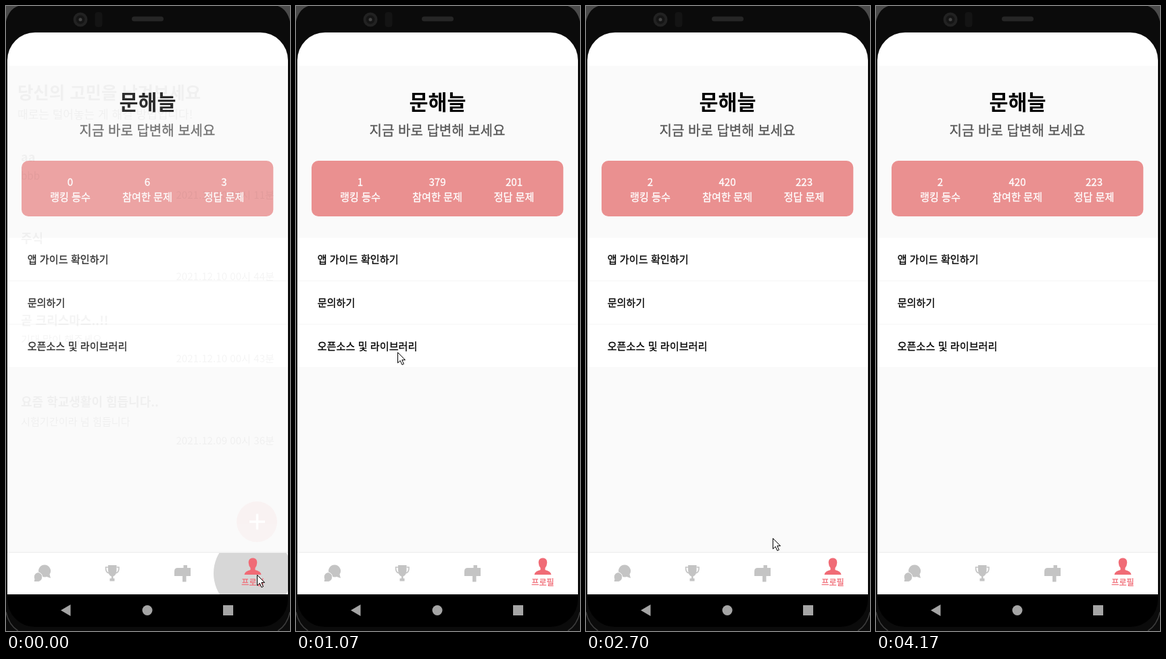
An HTML page that plays this animation: 420 px wide and 921 px high, repeating every 4.44 s.

```html
<!DOCTYPE html>
<html lang="ko">
<head>
<meta charset="utf-8">
<title>프로필</title>
<style>
  html, body { margin: 0; width: 100%; height: 100%; overflow: hidden; background: #0b0b0b; }
  svg { display: block; width: 420px; height: 921px; }
  text { font: 500 15.15px "Noto Sans CJK KR", "Noto Sans CJK JP", "Noto Sans", sans-serif; }
  .mid { text-anchor: middle; }
  .end { text-anchor: end; }
  .name { font-size: 30.4px; font-weight: 700; }
  .lead { font-size: 20px; fill: #555; stroke: #555; }
  .tab { font-size: 12.1px; fill: #f06b76; stroke: #f06b76; }
  .medium, .lead, .tab { stroke-width: .3px; }
  #old text { font-weight: 400; }
  #old .title { font-size: 25.4px; font-weight: 700; }
  #old .head { font-size: 18px; font-weight: 700; }
</style>
</head>
<body>
<svg viewBox="0 0 420 921">
  <defs>
    <clipPath id="screen"><path d="M2 867V80A41 41 0 0 1 43 39H376A41 41 0 0 1 417 80V867Z"/></clipPath>
    <clipPath id="bar"><path d="M2 806H417V867H2Z"/></clipPath>
  </defs>

  <!-- device -->
  <rect width="420" height="921" fill="#0b0b0b"/>
  <path d="M0 0H18Q4 5 0 23ZM420 0H402Q416 5 420 23Z" fill="#4a4a4a"/>
  <path d="M0 893Q4 912 18 921M402 921Q416 912 420 893" fill="none" stroke="#3c3c3c" stroke-width="1.5"/>
  <rect x="2" y="39" width="415" height="876" rx="41"/>
  <circle cx="110" cy="20" r="10.5" fill="#222"/>
  <circle cx="110" cy="20" r="6.500" fill="#151515"/>
  <circle cx="110" cy="20" r="2.500" fill="#444"/>
  <rect x="131.500" y="9" width="11" height="22" rx="4" fill="#141414"/>
  <rect x="186" y="15.500" width="47" height="7" rx="3.500" fill="#262626"/>

  <g clip-path="url(#screen)">
    <rect y="39" width="420" height="49" fill="#fff"/>
    <rect y="88" width="420" height="718" fill="#fafafa"/>
    <path d="M2 341.500H417V404H2ZM2 406H417V468H2ZM2 470H417V532H2Z" fill="#fff"/>

    <g id="profile">
      <text class="mid name" x="209.500" y="153">문해늘</text>
      <text class="mid lead" x="209" y="190.500">지금 바로 답변해 보세요</text>
      <rect x="23" y="228" width="372.300" height="82" rx="10" fill="#ea9090"/>
      <g id="stats" class="mid medium" fill="#fff" stroke="#fff"></g>
      <g class="medium" stroke="#000">
        <text x="31.700" y="378.500">앱 가이드 확인하기</text>
        <text x="31.700" y="442.500">문의하기</text>
        <text x="31.700" y="506.500">오픈소스 및 라이브러리</text>
      </g>
    </g>

    <!-- outgoing screen -->
    <g id="old" opacity=".04">
      <text class="title" x="17" y="137">당신의 고민을 남겨보세요</text>
      <text x="17" y="166" style="font-size:17px">때로는 털어놓는 게 해결 방법입니다!</text>
      <text class="head" x="22" y="229">aa</text>
      <text x="22" y="256">bbb</text>
      <text class="end" x="397" y="284">2021.12.10 00시 11분</text>
      <text class="head" x="22" y="349">주식</text>
      <text class="end" x="397" y="404">2021.12.10 00시 44분</text>
      <text class="head" x="22" y="470">곧 크리스마스..!!</text>
      <text x="22" y="497">기대 많이 해주세요</text>
      <text class="end" x="397" y="525">2021.12.10 00시 43분</text>
      <text class="head" x="22" y="590">요즘 학교생활이 힘듭니다..</text>
      <text x="22" y="618">시험기간이라 넘 힘듭니다</text>
      <text class="end" x="397" y="646">2021.12.09 00시 36분</text>
      <circle cx="371" cy="760" r="30" fill="#e84a4a"/>
    </g>
    <path id="plus" d="M360 760H383M371.500 748.500V771.500" stroke="#fff" stroke-width="3.500"/>

    <!-- tab bar -->
    <rect y="804.500" width="420" height="1.500" fill="#f0f0f0"/>
    <rect y="806" width="420" height="61" fill="#fff"/>
    <circle id="ripple" cx="365" cy="836" r="60" fill="#d7d7d7" clip-path="url(#bar)"/>
    <g fill="#c4c4c4">
      <path d="M57 823.500A9 9 0 0 1 64.500 837.500L66 843 60 841A9 9 0 1 1 57 823.500Z"/>
      <path d="M47.500 834.500A7 7 0 1 1 46 848.500L41 848.500 42 844.500A7 7 0 0 1 47.500 834.500Z" stroke="#fff" stroke-width="1"/>
      <path d="M151 824H163.500V832Q163 839 158.500 840.500V843.500H160.500V847.500H153.500V843.500H156V840.500Q151.500 839 151 832Z"/>
      <path d="M151 827H147.500Q147 835 153 836M163.500 827H167Q167.500 835 161.500 836" fill="none" stroke="#c4c4c4" stroke-width="1.600"/>
      <path d="M254 828H262.500V824H268V828H273V840H266.500V848.500H261V840H249V833Q249 828 254 828Z"/>
    </g>
    <path d="M365 813.500C369 813.500 371.500 816 371.300 820.500Q371 825.500 368.500 828V831Q377 833 377.500 838H352.500Q353 833 361.500 831V828Q359 825.500 358.700 820.500C358.500 816 361 813.500 365 813.500Z" fill="#f06b76"/>
    <text class="mid tab" x="365" y="853.500">프로필</text>
  </g>

  <!-- system keys -->
  <g fill="#a5a5a5">
    <path d="M81 890.500L95.500 882V899Z"/>
    <circle cx="209" cy="890.500" r="7.500"/>
    <rect x="321" y="883" width="15" height="15"/>
  </g>

  <path id="cursor" d="M.5.5V16L4.200 12.600 6.900 18.600 9.400 17.500 6.800 11.600H11.500Z" fill="#fff" stroke="#000"/>
</svg>

<script>
const LOOP = 4440, STEPS = 66;
const $ = id => document.getElementById(id);

const stats = [
  { x: 95, label: '랭킹 등수', total: 2 },
  { x: 209, label: '참여한 문제', total: 420 },
  { x: 322.5, label: '정답 문제', total: 223 }
];
$('stats').innerHTML = stats.map(({ x, label }) =>
  `<text x="${x}" y="265"></text><text x="${x}" y="286.5">${label}</text>`).join('');
const counters = document.querySelectorAll('#stats text:nth-child(odd)');

// pointer path: [step, x, y]
const path = [
  [0, 371, 838], [3, 371, 838], [8, 235, 570], [16, 150, 510],
  [23, 125, 494], [24, 113, 510], [26, 110, 524], [28, 110, 524],
  [36, 194, 670], [40, 276, 784], [44, 315, 807], [48, 352, 833],
  [52, 359, 787], [55, 386, 515]
];
const lastMove = 55, leaveStep = 61;

function pointerAt(step) {
  const i = Math.max(1, path.findIndex(p => p[0] >= step));
  const [s0, x0, y0] = path[i - 1], [s1, x1, y1] = path[i];
  const u = (step - s0) / (s1 - s0);
  return [x0 + (x1 - x0) * u, y0 + (y1 - y0) * u].map(Math.round);
}

function draw(time) {
  const step = Math.floor((time % LOOP + 6) / LOOP * STEPS) % STEPS;
  const first = step === 0;

  // counters ease in and out over 1.5 s, already running at the loop start
  const elapsed = first ? 120 : 134.5 + 66.6 * step;
  const progress = (1 - Math.cos(Math.PI * Math.min(1, elapsed / 1500))) / 2;
  stats.forEach(({ total }, i) => counters[i].textContent = Math.floor(total * progress));

  $('profile').setAttribute('opacity', first ? 0.82 : 1);
  $('old').style.display = $('plus').style.display = first ? '' : 'none';
  $('ripple').setAttribute('r', first ? 58 : 60);
  $('ripple').setAttribute('opacity', Math.min(1, Math.max(0, (6 - step) / 4)));

  const leaving = step === leaveStep;
  const [x, y] = leaving ? [418, 911] : pointerAt(Math.min(step, lastMove));
  $('cursor').setAttribute('transform', `translate(${x} ${y})`);
  $('cursor').style.display = step <= lastMove || leaving ? '' : 'none';
}

function tick() {
  draw(performance.now());
  requestAnimationFrame(tick);
}
tick();
</script>
</body>
</html>
```
